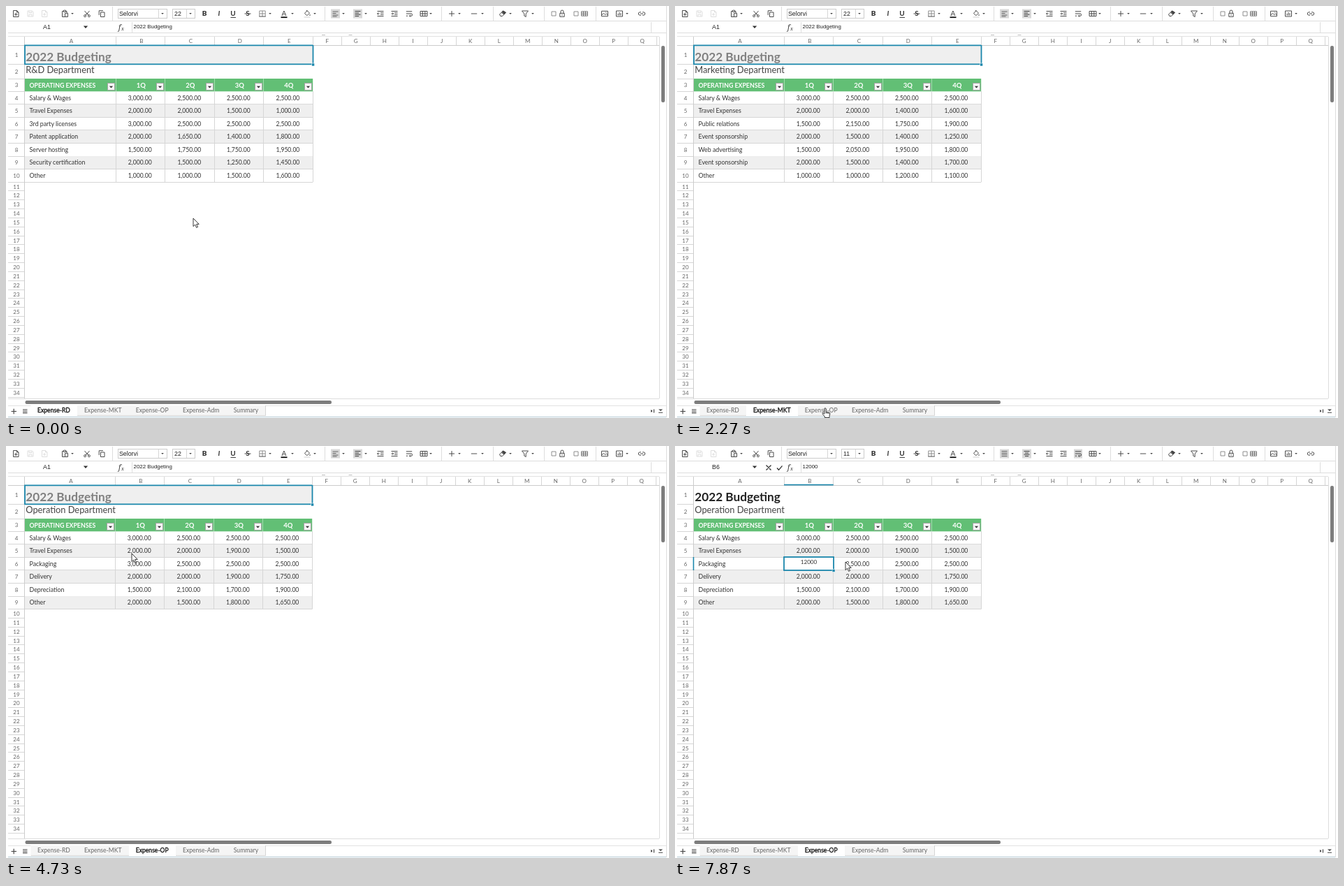
These frames come from a looping animation (949 px wide and 590 px high, 8 s). An HTML page:

```html
<!DOCTYPE html>
<html lang="en">
<head>
<meta charset="utf-8">
<title>Budget spreadsheet</title>
<style>
  html, body { margin: 0; width: 100%; height: 100%; overflow: hidden; background: #fff; }
  svg { display: block; width: 949px; height: 590px; }
  text { white-space: pre; }
</style>
</head>
<body>
<svg id="stage" viewBox="0 0 949 590" xmlns="http://www.w3.org/2000/svg">
  <g id="scene"></g>
  <g id="pointer"></g>
</svg>
<script>
const LATO = "Lato, 'Open Sans', sans-serif";
const ARIAL = "'Liberation Sans', Arial, sans-serif";
const TEAL = '#1b87ac', INK = '#444', LINE = '#d6d6d6';
const LOOP = 8000, FPS = 15;

const TABS = ['Expense-RD', 'Expense-MKT', 'Expense-OP', 'Expense-Adm', 'Summary'];
const TAB_EDGES = [35.5, 102, 176, 243, 316, 371.5];

const SHEETS = [
  { dept: 'R&D Department', rows: [
    'Salary & Wages|3000 2500 2500 2500', 'Travel Expenses|2000 2000 1500 1000',
    '3rd party licenses|3000 2500 2500 2500', 'Patent application|2000 1650 1400 1800',
    'Server hosting|1500 1750 1750 1950', 'Security certification|2000 1500 1250 1450',
    'Other|1000 1000 1500 1600'] },
  { dept: 'Marketing Department', rows: [
    'Salary & Wages|3000 2500 2500 2500', 'Travel Expenses|2000 2000 1400 1600',
    'Public relations|1500 2150 1750 1900', 'Event sponsorship|2000 1500 1400 1250',
    'Web advertising|1500 2050 1950 1800', 'Event sponsorship|2000 1500 1400 1700',
    'Other|1000 1000 1200 1100'] },
  { dept: 'Operation Department', rows: [
    'Salary & Wages|3000 2500 2500 2500', 'Travel Expenses|2000 2000 1900 1500',
    'Packaging|3000 2500 2500 2500', 'Delivery|2000 2000 1900 1750',
    'Depreciation|1500 2100 1700 1900', 'Other|2000 1500 1800 1650'] }
];

const esc = s => String(s).replace(/&/g, '&amp;').replace(/</g, '&lt;');
const money = n => (+n).toLocaleString('en-US', { minimumFractionDigits: 2 });

function text(x, y, str, size, o = {}) {
  const { fill = '#333', anchor = 'start', weight = 400, font = LATO, extra = '' } = o;
  return `<text x="${x}" y="${y}" font-size="${size}" font-family="${font}" font-weight="${weight}" ` +
    `fill="${fill}" text-anchor="${anchor}" ${extra}>${esc(str)}</text>`;
}
const rect = (x, y, w, h, fill, stroke = 'none', sw = 1) =>
  `<rect x="${x}" y="${y}" width="${w}" height="${h}" fill="${fill}" stroke="${stroke}" stroke-width="${sw}"/>`;
const path = (d, stroke = INK, sw = 1, fill = 'none') =>
  `<path d="${d}" stroke="${stroke}" stroke-width="${sw}" fill="${fill}"/>`;
const at = (x, y, inner) => `<g transform="translate(${x} ${y})">${inner}</g>`;
const vline = (x, y1, y2, c = LINE) => path(`M${x} ${y1}V${y2}`, c);
const hline = (y, x1, x2, c = LINE) => path(`M${x1} ${y}H${x2}`, c);
const caretDown = (x, y, r = 1.8, c = INK) => path(`M${x - r} ${y - r / 2}h${2 * r}l${-r} ${r * 1.1}z`, 'none', 0, c);

// Toolbar icons as outlines around their own centre
const PAGE = 'M-3.5-4.5H1.5L4-2V4.5H-3.5ZM1.5-4.5V-2H4';
const DISK = 'M-4-4H2.5L4-2.5V4H-4ZM-2-4V-1.5H2V-4M-2 4V1H2V4';
const ICONS = [
  [14, PAGE + 'M-2 1H2.5M.2-1.2V3.2'], [35, DISK, '#ddd'], [55, PAGE + 'M-2 1H2M0-1V3', '#ddd'],
  [84, 'M-1.5-3.5H-3.5V4.5H.5M1.5-3.5H3V-1M-1.5-4.8H1.5V-2.6H-1.5ZM.5-.7H4.5V4.5H.5Z'],
  [116, 'M-3.5-4L2.2 2.4M3.5-4L-2.2 2.4M-4.4 3.2a1.5 1.5 0 1 0 3 0a1.5 1.5 0 1 0-3 0M1.4 3.2a1.5 1.5 0 1 0 3 0a1.5 1.5 0 1 0-3 0'],
  [137, 'M-1.5-2H4V4.5H-1.5ZM-3.8 2V-4.3H2'],
  [367, 'M-4.2-4H4.2M-4.2-4V4M4.2-4V4M0-4V4M-4.2 0H4.2', '#888'],
  [367, 'M-4.7 4H4.7', INK],
  [431, 'M-3.6-.6L.2-4.2L3.6-.8L-.2 2.6ZM-1.2-5L.4-3.4M4 1v2'],
  [536, 'M-4.5-3.5H4.5M0-1.2H4.5M0 1.2H4.5M-4.5 3.5H4.5M-1.5 0H-4.5M-3-1.6L-4.6 0L-3 1.6'],
  [556, 'M-4.5-3.5H4.5M0-1.2H4.5M0 1.2H4.5M-4.5 3.5H4.5M-4.5 0H-1.5M-3-1.6L-1.4 0L-3 1.6'],
  [598, 'M-5-3.5H5V3.5H-5ZM-5 0H5M-1.6-3.5V3.5M1.8-3.5V3.5'],
  [638, 'M-4 0H4M0-4V4'], [670, 'M-4.2 0H4.2'],
  [711, 'M-4.5 1L.5-4L4.5-1.6L-.5 3.5H-3.2ZM-1.8-1.6L2 1'],
  [711, 'M-1-2.5L.8-4L4.2-1.6L2 .8Z', INK, INK],
  [743, 'M-4.5-4H4.5L1.2 0V4.5L-1.2 3V0Z'],
  [784, 'M-3-3H3V3H-3Z', '#888'], [796, 'M-3.2-.6H3.2V4.3H-3.2ZM-2-.6V-3a2 2 0 0 1 4 0V-.6M0 1V2.6'],
  [816, 'M-3-3H3V3H-3Z', '#888'], [828, 'M-4.5-3.2H4.5V3.2H-4.5ZM-4.5-1H4.5M-4.5 1.1H4.5M-1.5-3.2V3.2M1.5-3.2V3.2', '#777'],
  [857, 'M-4.5-3.7H4.5V3.7H-4.5ZM-4.5 2L-1.5-.5L.8 1.5L2.5 0L4.5 2M1.2-1.8h1.4'],
  [878, 'M-4.5-4H4.5V4H-4.5ZM-2 2.5V0M0 2.5V-2M2 2.5V-.8'],
  [910, 'M-1 2.2H-2.5a2.2 2.2 0 0 1 0-4.4H-1M1-2.2H2.5a2.2 2.2 0 0 1 0 4.4H1M-2 0H2']
];
const MENU_ARROWS = [95, 378, 410, 442, 483, 515, 608, 649, 682, 722, 754, 889];

function toolbar(cellMode) {
  let s = '';
  s += rect(465, 4.5, 13, 13, '#d8d8d8') + rect(497, 4.5, 13, 13, '#d8d8d8');
  if (cellMode) s += rect(571, 4.5, 12, 13, '#d8d8d8');
  for (const [x, d, c = INK, fill] of ICONS) s += at(x, 11, path(d, c, 0.95, fill));
  const wrap = 'M-4.2-3.2H4.2M-4.2 0H3a1.6 1.6 0 0 1 0 3.2H.5M1.8 1.8L.4 3.2L1.8 4.6M-4.2 3.2H-2';
  s += at(577, 11, path(wrap));
  s += at(471.5, 11, path(cellMode ? 'M-4-3.5H4M-4-1H4M-4 1H4M-4 3.5H4' : 'M-4-3H4M-4-.5H1M-4 2H4M-4 4H2', '#666'));
  s += at(503.5, 11, path(cellMode ? 'M-4-3.5H4M-2.5-1H2.5M-4 1.2H4M-2.5 3.5H2.5' : 'M-4-3.5H4M-4-1H1.5M-4 1.2H4M-4 3.5H1.5'));
  for (const x of MENU_ARROWS) s += caretDown(x, 11);
  for (const x of [152.5, 456.5, 623.5, 697.5, 770.5, 844.5]) s += vline(x, 1, 21, '#ddd');
  s += rect(160.5, 4.5, 70, 13, '#fff', '#ccc') + vline(218.5, 5, 17) + caretDown(224, 11);
  s += rect(238.5, 4.5, 32, 13, '#fff', '#ccc') + vline(258.5, 5, 17) + caretDown(264, 11);
  s += text(162, 14.2, 'Selorvi', 8.8, { font: ARIAL, fill: '#222' });
  s += text(241, 14.2, cellMode ? '11' : '22', 8.8, { font: ARIAL, fill: '#222' });
  const letter = (x, c, weight, extra = '') => text(x, 14.4, c, 10, { anchor: 'middle', weight, extra });
  s += letter(284, 'B', 900) + letter(305, 'I', 700, 'font-style="italic"') + letter(325, 'U', 700);
  s += letter(346, 'S', 700) + letter(398, 'A', 400);
  s += hline(16.5, 321.5, 329) + path('M321.5 16.5H329M341.5 11H350.5', INK, 1);
  s += rect(393.5, 15.3, 9, 1.8, '#111') + rect(426.5, 15.3, 9, 1.4, '#ddd');
  return s + hline(21.5, 3, 945, '#ddd');
}

function formulaBar(name, value, editing) {
  let s = text(58.5, 33, name, 8.8, { font: ARIAL, anchor: 'middle', fill: '#222' });
  s += caretDown(114, 30, 3.2, '#333');
  s += text(161, 33.5, 'f', 10, { font: "'Noto Serif', serif", extra: 'font-style="italic"' });
  s += text(165, 34.5, 'x', 7, { font: "'Noto Serif', serif", extra: 'font-style="italic"' });
  s += vline(180.5, 23, 38, '#ddd') + vline(923.5, 23, 38, '#ddd');
  s += text(182.5, 32.3, value, 7.9, { font: ARIAL, fill: '#222' });
  if (editing) s += path('M130.5 27.5l7 7m0-7l-7 7M146 31.5l2.5 2.8l5-6', '#333', 1.3);
  s += hline(38.5, 3, 945, '#ddd');
  return s + path('M452 41.5H457M490.5 41.5H495.5', '#bbb', 1);
}

function rowEdges(dataRows) {
  const edges = [56, 83.5, 104];
  for (let i = 0; i <= dataRows; i++) edges.push(122.3 + i * 18.55);
  while (edges.length < 35) edges.push(edges[edges.length - 1] + 12.83);
  return edges;
}

function grid(state) {
  const sheet = SHEETS[state.sheet], n = sheet.rows.length;
  const xs = [27], ys = rowEdges(n);
  const first = state.sheet ? 156 : 157;
  for (let i = 0; i < 5; i++) xs.push(first + i * 70.55);
  while (xs.length < 18) xs.push(xs[xs.length - 1] + 41);
  const right = xs[5], snap = v => Math.floor(v) + 0.5;
  let s = '';

  // Headers
  s += hline(43.5, 3, 935, '#e2e2e2');
  for (let i = 0; i < 17; i++) {
    const mid = (xs[i] + xs[i + 1]) / 2 + (i < 5 ? 1.5 : 0);
    s += text(Math.min(mid, 911), 53, String.fromCharCode(65 + i), 8, { anchor: 'middle', fill: '#666' });
    if (xs[i + 1] < 935) s += vline(snap(xs[i + 1]), 44, 56);
  }
  for (let r = 0; r < 34; r++) {
    const mid = (ys[r] + ys[r + 1]) / 2;
    s += text(15, mid + 3.1, r + 1, 8, { anchor: 'middle', fill: '#666' });
    if (ys[r + 1] < 562) s += hline(snap(ys[r + 1]), 3, 26);
  }
  s += hline(56.5, 3, 935, '#ccc') + vline(26.5, 44, 562, '#ccc');

  // Title block
  if (!state.cell) s += rect(27, 57, right - 27, 26, '#efefef');
  s += text(28.3, 78.6, '2022 Budgeting', 17.2, { weight: 700, fill: state.cell ? '#222' : '#808080' });
  s += text(28.3, 96.2, sheet.dept, 12.8, { fill: '#444' });

  // Table head
  s += rect(27, 104, right - 27, 18.3, '#62bf75');
  s += text(33.5, 116.8, 'OPERATING EXPENSES', 8.8, { weight: 700, fill: '#fff' });
  for (let c = 0; c < 5; c++) {
    const r = xs[c + 1];
    if (c) s += text((xs[c] + r) / 2 + 1, 117, c + 'Q', 9.5, { weight: 700, fill: '#fff', anchor: 'middle' });
    if (c < 4) s += vline(snap(r), 104, 122, '#a3dbae');
    s += rect(snap(r - 12), 110.5, 10, 10, '#f6f6f6', '#a5a5a5') + caretDown(snap(r - 12) + 5, 116, 2.6, '#333');
  }

  // Table body
  sheet.rows.forEach((line, i) => {
    const [label, nums] = line.split('|'), top = ys[i + 3], h = ys[i + 4] - top;
    if (i % 2) s += rect(27, top, right - 27, h, '#efefef');
    const base = top + h / 2 + 3.1;
    s += text(33.5, base, label, 8.8);
    nums.split(' ').forEach((v, c) => {
      if (state.edit && i === 2 && c === 0) return;
      s += text((xs[c + 1] + xs[c + 2]) / 2 - 0.5, base, money(v), 8.6, { anchor: 'middle' });
    });
    s += hline(snap(ys[i + 4]), 27, right);
  });
  for (let c = 1; c < 6; c++) s += vline(snap(xs[c]), 122, ys[n + 3]);

  // Selection
  if (state.cell) {
    const [l, r, t, b] = [xs[1], xs[2], 159, 178];
    s += hline(55.7, l, r, TEAL) + vline(26.5, t, b, TEAL);
    s += path(`M${l} 55.5H${r}M26.5 ${t}V${b}`, TEAL, 1.6);
    s += rect(l, t, r - l + 0.5, b - t, state.edit ? '#fff' : 'none', TEAL, 1.8);
    s += rect(r - 1.5, b - 1.5, 4, 4, TEAL, '#fff', 0.6);
    if (state.edit) {
      s += text(191.5, 169.3, state.edit, 8.1, { anchor: 'middle' });
      if (state.caret) s += vline(191.5 + Math.round(state.edit.length * 2.35) + 0.3, 159.5, 172, '#222');
    }
  } else {
    if (!state.pending) s += path(`M27 84V56.3H${right}`, TEAL, 1.8);
    s += path(`M27 83.4H${right + 0.3}V56`, TEAL, 1.8);
    s += rect(right - 1.5, 82, 4, 4, TEAL, '#fff', 0.6);
  }
  return s;
}

function footer(active) {
  let s = vline(935.5, 44, 562, '#ddd') + hline(562.5, 3, 935, '#ddd') + vline(945.5, 0, 589, '#ddd');
  s += `<rect x="938" y="57" width="5" height="81" rx="2.2" fill="#7d7d7d"/>`;
  s += `<rect x="27.5" y="565" width="438.5" height="5" rx="2.2" fill="#7d7d7d"/>`;
  s += hline(572.5, 3, 945, '#e2e2e2');
  TABS.forEach((name, i) => {
    const l = TAB_EDGES[i], r = TAB_EDGES[i + 1], on = i === active;
    s += rect(l, 572, r - l, on ? 15 : 14, on ? '#fff' : '#f5f5f5');
    if (!on) s += hline(586.5, l, r, '#d5d5d5');
    s += vline(Math.floor(r) + 0.5, 572, 587, '#d5d5d5');
    s += text((l + r) / 2 - 0.3, on ? 581.6 : 582.2, name, 8.6, {
      anchor: 'middle', fill: on ? '#111' : '#666', extra: on ? 'stroke="#111" stroke-width=".3"' : ''
    });
  });
  s += path('M7.5 580.5H15M11.2 576.7V584.3', INK, 1.2);
  s += path('M24 578H30.5M24 580.3H30.5M24 582.6H30.5', INK, 1.1);
  s += path('M923 578v4l2.6-2zM934 577.5h6l-3 2.6z', 'none', 0, INK);
  s += path('M927.5 577.5V582.5M934 582.3H940', INK, 1.1);
  return s + hline(588.5, 3, 945, '#b5cbd5');
}

const ARROW = path('M0 0V11.6L2.7 9.1L4.6 13.4L6.5 12.5L4.7 8.4H8.2Z', '#222', 0.9, '#fff');
const HAND = path('M-1.2 1a1.1 1.1 0 0 1 2.3 0V5.2L5.6 6.1Q7 6.5 6.8 8L6 11.2V13.5H-.6V12L-3.9 8.2Q-4.4 7-3.2 6.7L-1.2 8.2Z' +
  'M1.1 5.2V7.5M3 5.7V7.8M4.9 6.2V8', '#222', 0.9, '#fff');

const smooth = u => u * u * (3 - 2 * u);
const easeOut = u => 1 - (1 - u) ** 1.6;
// start, end, x, y, easing of each pointer move
const MOVES = [
  [205, 1070, 154, 555, easeOut], [1075, 1400, 144, 573, smooth],
  [1875, 2270, 215, 576, smooth], [4075, 4670, 177, 145, smooth],
  [4675, 4800, 183, 163, smooth], [5010, 5400, 244, 166, smooth]
];

function pointerAt(t) {
  let x = 268, y = 304;
  for (const [start, end, tx, ty, ease] of MOVES) {
    const u = ease(Math.min(1, Math.max(0, (t - start) / (end - start))));
    x += (tx - x) * u;
    y += (ty - y) * u;
  }
  return { x, y };
}

const since = (t, steps) => steps.filter(s => t >= s).length;

function stateAt(t) {
  const tab = since(t, [1600, 3530]), sheet = since(t, [1930, 3930]);
  const digits = since(t, [6070, 6200, 7000, 7200, 7330]);
  return {
    tab, sheet, pending: tab !== sheet, cell: t >= 5070,
    edit: '12000'.slice(0, digits),
    caret: t < 6670 || (t >= 7000 && t < 7870)
  };
}

const scene = document.getElementById('scene'), pointer = document.getElementById('pointer');
let drawn = '', shape = '';

function render(time) {
  const t = Math.floor((time + 5) * FPS / 1000) * 1000 / FPS + 4;
  const state = stateAt(t), key = JSON.stringify(state);
  if (key !== drawn) {
    drawn = key;
    const value = state.edit || (state.cell ? '3000' : '2022 Budgeting');
    scene.innerHTML = rect(0, 0, 949, 590, '#fff') + toolbar(state.cell) +
      formulaBar(state.cell ? 'B6' : 'A1', value, !!state.edit) + grid(state) + footer(state.tab);
  }
  const { x, y } = pointerAt(t);
  const over = TAB_EDGES.findIndex((e, i) => x >= e && x < TAB_EDGES[i + 1]);
  const next = y > 571.5 && over !== state.tab ? HAND : ARROW;
  if (next !== shape) pointer.innerHTML = shape = next;
  pointer.setAttribute('transform', `translate(${x.toFixed(1)} ${y.toFixed(1)})`);
}

const begin = performance.now();
function loop() {
  render((performance.now() - begin) % LOOP);
  requestAnimationFrame(loop);
}
loop();
</script>
</body>
</html>
```
